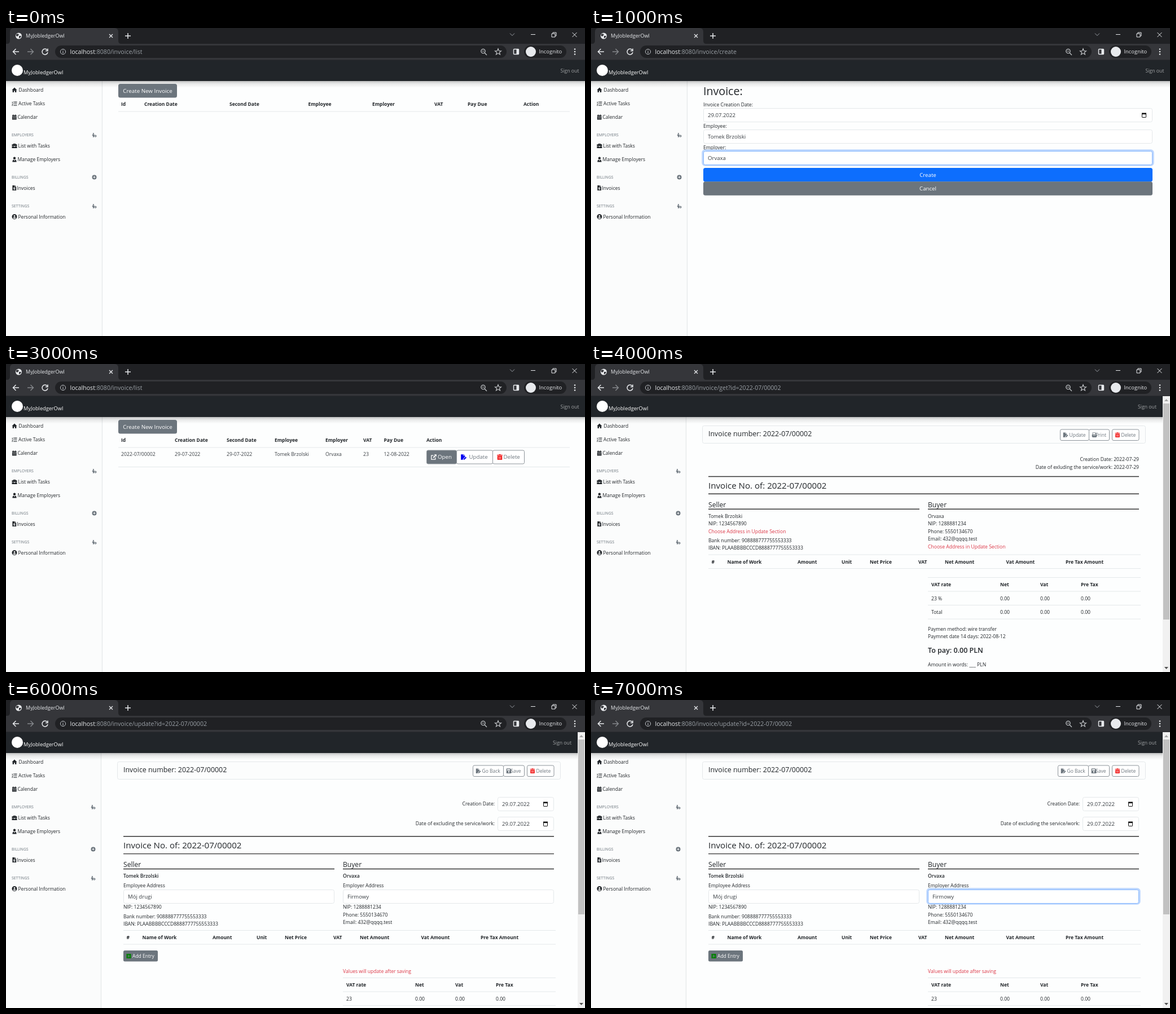
These frames come from a looping animation (1026 by 546 pixels, 8 s). An HTML page:

```html
<!DOCTYPE html>
<html lang="en">
<head>
<meta charset="utf-8">
<title>Invoices</title>
<style>
html, body { margin: 0; width: 100%; height: 100%; overflow: hidden; background: #fdfefe; }
svg { display: block; font-family: "Open Sans", "Noto Sans", sans-serif; }
</style>
</head>
<body>
<svg id="stage" width="1026" height="546" viewBox="0 0 1026 546"></svg>
<script>
const INK = '#212529', GRAY = '#6c757d', RED = '#dc3545', LINE = '#e4e8ea', BAR = '#202124', TAB = '#35363a';
const APP = 'MyJobledgerOwl', PERSON = 'Tomek Brzolski', FIRM = 'Orvaxa', NUMBER = '2022-07/00002';

// y is the vertical centre of the capitals
const text = (x, y, s, { size = 8.6, fill = INK, weight = 400, anchor = 'start' } = {}) =>
  `<text x="${x}" y="${y + size * .357}" font-size="${size}" fill="${fill}" font-weight="${weight}" text-anchor="${anchor}">${s}</text>`;
const rect = (x, y, w, h, fill, r = 0, stroke = 'none', sw = 1) =>
  `<rect x="${x}" y="${y}" width="${w}" height="${h}" rx="${r}" fill="${fill}" stroke="${stroke}" stroke-width="${sw}"/>`;
const path = (d, stroke, w = 1.3, fill = 'none') =>
  `<path d="${d}" stroke="${stroke}" stroke-width="${w}" fill="${fill}"/>`;
const shape = (d, fill) => `<path d="${d}" fill="${fill}" fill-rule="evenodd"/>`;
const disc = (x, y, r, fill, stroke = 'none', w = 1.2) =>
  `<circle cx="${x}" cy="${y}" r="${r}" fill="${fill}" stroke="${stroke}" stroke-width="${w}"/>`;
const rule = (x1, x2, y, color = LINE, w = 1) => path(`M${x1} ${y}H${x2}`, color, w);

// Filled glyphs on a 10 x 10 grid
const GLYPHS = {
  house: 'M5 0L10 5H8.7V9.5H6V6.5H4V9.5H1.3V5H0Z',
  list: 'M0 1.5L1.3 2.8L3 .6V2L1.3 4L0 2.7ZM0 5L1.3 6.2L3 4V5.4L1.3 7.4L0 6.2ZM4 1.5H10V2.7H4ZM4 4.7H10V5.9H4ZM3 8H10V9.2H3ZM0 8H1.6V9.4H0Z',
  calendar: 'M.5 1.2H2V0H3.3V1.2H6.2V0H7.5V1.2H9V3H.5ZM.5 3.6H9V10H.5ZM2 5V6H3.2V5ZM4.2 5V6H5.4V5ZM6.4 5V6H7.6V5ZM2 7.4V8.4H3.2V7.4ZM4.2 7.4V8.4H5.4V7.4ZM6.4 7.4V8.4H7.6V7.4Z',
  briefcase: 'M2.5 2V.5H7.5V2H10V5.2H0V2ZM3.7 2H6.3V1.6H3.7ZM0 5.9H4V7H6V5.9H10V9.5H0Z',
  person: 'M5 0A2.4 2.4 0 0 1 5 4.9A2.4 2.4 0 0 1 5 0ZM1 10Q1 5.7 3.8 5.5L5 8L6.2 5.5Q9 5.7 9 10Z',
  invoice: 'M1 0H5.5V3H8.5V10H1ZM6.2 0L8.5 2.4H6.2ZM4.2 3.6V4.4H3V6.6H5.4V7.4H3V8.2H4.2V9H5.2V8.2H6.4V5.8H4V5.2H6.4V4.4H5.2V3.6Z',
  account: 'M5 0A5 5 0 0 1 5 10A5 5 0 0 1 5 0ZM5 2A1.7 1.7 0 0 0 5 5.4A1.7 1.7 0 0 0 5 2ZM2 7.7Q5 10.2 8 7.7Q7 6.2 5 6.2Q3 6.2 2 7.7Z',
  plus: 'M5 0A5 5 0 0 1 5 10A5 5 0 0 1 5 0ZM4.4 2.5V4.4H2.5V5.6H4.4V7.5H5.6V5.6H7.5V4.4H5.6V2.5Z',
  add: 'M3 0A1.4 1.4 0 0 1 3 2.8A1.4 1.4 0 0 1 3 0ZM1 3.2H5V6H4.4V9.5H1.8V6H0ZM7.5 4.5A2.5 2.5 0 0 1 7.5 9.5A2.5 2.5 0 0 1 7.5 4.5ZM7.5 6A1 1 0 0 0 7.5 8A1 1 0 0 0 7.5 6Z',
  open: 'M0 1.5H4.5V2.8H1.3V8.7H7.2V5.5H8.5V10H0ZM5.5 0H10V4.5L8.5 3L4.8 6.7L3.5 5.4L7.1 1.7Z',
  edit: 'M0 0H4.5V3H7.5V4.6L4 8L3.5 10H0ZM5.2 0L7.5 2.4H5.2ZM8.7 4.4L10.3 6L6.5 9.6L4.5 10L5 8.1Z',
  trash: 'M0 1H3L3.5 0H6.5L7 1H10V2.2H0ZM.7 3H9.3V10H.7ZM2.6 4.2V8.7H3.4V4.2ZM4.6 4.2V8.7H5.4V4.2ZM6.6 4.2V8.7H7.4V4.2Z',
  print: 'M1 0H7L9 2V4H10V9H9V10H1V9H0V4H1ZM2 1V4H8V2.5H6.5V1ZM2 6V6.8H8V6Z',
  save: 'M0 0H8L10 2V10H0ZM1.5 1.5V4H7.5V1.5ZM5 5.2A1.5 1.5 0 0 0 5 8.4A1.5 1.5 0 0 0 5 5.2Z',
  entry: 'M0 0H10V10H0ZM4.3 2V4.3H2V5.7H4.3V8H5.7V5.7H8V4.3H5.7V2Z'
};
const icon = (name, x, y, size, fill) =>
  `<g transform="translate(${x - size / 2} ${y - size / 2}) scale(${size / 10})">${shape(GLYPHS[name], fill)}</g>`;

const head = (y, cells) => cells.map(([x, s]) => text(x, y, s, { size: 8.5, weight: 700 })).join('');
const lines = (x, rows, style) => rows.map(([y, s]) => text(x, y, s, style)).join('');
const dateIcon = (x, y) => rect(x - 3.5, y - 3, 7, 7, 'none', .6, '#111') + rect(x - 4, y - 4, 8, 2.6, '#111');

function input(x, y, w, value, focus) {
  const glow = focus ? rect(x - 1, y - 1, w + 2, 26, 'none', 4, '#bcd6fe', 3.4) : '';
  return glow + rect(x + .5, y + .5, w - 1, 24, '#fff', 3, focus ? '#86b7fe' : LINE) +
    text(x + 8, y + 13, value, { size: 9.6, fill: '#383d42' });
}

// Buttons: [left, width, glyph, label, label x, glyph colour, hovered]
const buttons = (y, h, size, list) => list.map(([x, w, glyph, label, labelX, color, hovered]) =>
  rect(x + .5, y + .5, w, h, hovered ? GRAY : '#fff', 2.5, '#8d949a') +
  icon(glyph, x + (size > 9 ? 13 : 10), y + h / 2 + .5, size, hovered ? '#fff' : color) +
  text(labelX, y + h / 2 + .5, label, { size, fill: hovered ? '#fff' : GRAY })).join('');

function browser(url) {
  const white = '#e8eaed', dim = '#85888c';
  return rect(0, 0, 1026, 57, BAR) + rect(0, 28, 1026, 28.5, TAB) +
    shape('M2 28Q7 28 7 22V7Q7 0 14 0H192Q199 0 199 7V22Q199 28 204 28Z', TAB) +
    disc(22.5, 14, 5.5, white) + shape('M18 11Q22 9 23 12L20 15L18 14ZM23 14H27Q26 18 23 18Z', TAB) +
    text(35, 13.7, APP, { size: 9, fill: white }) +
    path('M183 11L189 17M189 11L183 17', white) + path('M211 14H221M216 9V19', white, 1.5) +
    path('M893 9.5L897 13.5L901 9.5', '#9aa0a6', 1) +
    path('M930 11.5H938M967 10V16H973V10ZM969 10V8H975V14H973M1003.500 8L1011.500 16M1011.500 8L1003.500 16', white, 1) +
    path('M23 42H13M17.500 37L12.500 42L17.500 47', white, 1.5) +
    path('M38 42H48M43.500 37L48.500 42L43.500 47', dim, 1.4) +
    path('M73 39A5 5 0 1 0 74 43M74 36.500V40.500H70', white, 1.5) +
    rect(87, 31, 800, 22, BAR, 11) + disc(101, 42, 4.6, 'none', '#bdc1c6', 1) + path('M101 41V45M101 39V40', '#bdc1c6', 1.1) +
    text(113.5, 42, `localhost<tspan fill="#9aa0a6">:8080/invoice/${url}</tspan>`, { size: 10.6, fill: white }) +
    disc(845.5, 41, 3.7, 'none', '#c6c9cc') + path('M848 44L852 48M843.500 41H847.500', '#c6c9cc', 1.2) +
    path('M872 36.500L873.500 40.500L877.500 40.700L874.300 43.200L875.500 47L872 44.800L868.500 47L869.700 43.200L866.500 40.700L870.500 40.500Z', '#c6c9cc', 1.1) +
    rect(899.5, 37.5, 9, 9, 'none', 1, white, 1.4) + rect(904.5, 37.5, 4, 9, white) +
    rect(918, 31, 75, 22, BAR, 11) + disc(930, 42, 9, white) +
    text(944.5, 42, 'Incognito', { size: 9.4, fill: white }) +
    [37.5, 42, 46.500].map(y => disc(1008, y, 1.3, white)).join('');
}

function frame(url, thumbEnd) {
  const side = thumbEnd ? 168.5 : 170.5, right = thumbEnd ? 1002 : 1015.5;
  const items = [[110, 'house', 'Dashboard', 22.5], [134, 'list', 'Active Tasks', 22], [158, 'calendar', 'Calendar', 20.5],
    [209, 'briefcase', 'List with Tasks', 21.5], [233, 'person', 'Manage Employers', 20.5],
    [283.5, 'invoice', 'Invoices', 19.5], [334.5, 'account', 'Personal Information', 21.5]];
  const groups = [[190, 'EMPLOYERS', 'add'], [264.5, 'BILLINGS', 'plus'], [316, 'SETTINGS', 'add']];
  const scrollbar = thumbEnd ? rect(1013, 57, 13, 489, '#f1f1f1') + rect(1014, 70, 11, thumbEnd - 70, '#c1c1c1') +
    shape('M1016 66L1019.500 62L1023 66Z', '#a3a3a3') + shape('M1016 537L1019.500 541L1023 537Z', '#505050') : '';
  return `<defs><linearGradient id="shade" x2="0" y2="1"><stop stop-color="#000" stop-opacity=".24"/>
    <stop offset=".4" stop-color="#000" stop-opacity=".08"/><stop offset="1" stop-opacity="0"/></linearGradient></defs>` +
    rect(0, 57, side, 489, '#fbfcfc') + path(`M${side} 94V546`, '#e6e9ea') +
    rect(0, 94, 1026, 12, 'url(#shade)') + rect(0, 57, 1026, 37, INK) +
    disc(20, 75, 10, '#fff') + text(31, 79, APP, { size: 9.2, fill: '#fff' }) +
    text(right, 76, 'Sign out', { size: 8.7, fill: '#a0a3a5', anchor: 'end' }) +
    items.map(([y, glyph, s, x]) => icon(glyph, 15, y, 9, INK) + text(x, y, s, { size: 8.5, weight: 500 })).join('') +
    groups.map(([y, s, glyph]) => text(10, y, s, { size: 6.9, fill: GRAY, weight: 500 }) +
      icon(glyph, side - 14, y, 8, GRAY)).join('') + scrollbar + browser(url);
}

function listPage(filled, hoverOpen) {
  const xs = filled ? [204, 299, 391, 476, 566, 633, 669.5, 745] : [204, 245, 396, 535.5, 649, 759, 818, 917];
  const titles = ['Id', 'Creation Date', 'Second Date', 'Employee', 'Employer', 'VAT', 'Pay Due', 'Action'];
  const values = [NUMBER, '29-07-2022', '29-07-2022', PERSON, FIRM, '23', '12-08-2022'];
  return frame('list') + rect(199, 99, 104, 24.5, GRAY, 3.5) +
    text(251, 111.5, 'Create New Invoice', { size: 9.8, fill: '#fff', anchor: 'middle' }) +
    head(135, titles.map((s, i) => [xs[i], s])) + rule(199, 999, 148) +
    (filled ? values.map((s, i) => text(xs[i], 160, s, { size: 8.7, fill: '#3a3f44' })).join('') + rule(199, 999, 182.5) +
      buttons(152.5, 24, 9.7, [[745, 53, 'open', 'Open', 765, '#008000', hoverOpen],
        [798, 64, 'edit', 'Update', 820.5, '#0000f0'], [862, 56, 'trash', 'Delete', 881.5, '#f00000']]) : '');
}

function createPage() {
  const bar = (y, s, fill) => rect(199, y, 796, 24.5, fill, 3.5) +
    text(597, y + 12.5, s, { size: 9.7, fill: '#fff', anchor: 'middle' });
  return frame('create') + text(199, 112.5, 'Invoice:', { size: 19.6, weight: 500 }) +
    lines(199, [[136, 'Invoice Creation Date:'], [174, 'Employee:'], [211.5, 'Employer:']]) +
    input(199, 142, 796, '29.07.2022') + dateIcon(980, 154.5) + input(199, 180, 796, PERSON) +
    input(199, 218, 796, FIRM, true) + bar(248, 'Create', '#0d6efd') + bar(272.3, 'Cancel', GRAY);
}

function invoiceTop(shift, actions) {
  return rect(197.5, 109.5, 785, 31, '#fcfdfd', 3, LINE) +
    text(208, 124, 'Invoice number: ' + NUMBER, { size: 12.4, weight: 500 }) +
    buttons(115.5, 19.5, 8.5, [...actions, [923, 47.5, 'trash', 'Delete', 939.5, '#f00000']]) +
    rule(208, 971, 199.5 + shift, '#333', 1.4) + rule(208, 971, 230.3 + shift, '#333', 1.4) +
    text(208, 215.5 + shift, 'Invoice No. of: ' + NUMBER, { size: 15.1, weight: 500 }) +
    [[208, 'Seller'], [597, 'Buyer']].map(([x, s]) => text(x, 249.5 + shift, s, { size: 12.1, weight: 500 }) +
      rule(x, x + 374, 257.2 + shift, '#333', 1.4)).join('');
}

const workTable = y => rule(208, 974, y - 12.5) + rule(208, 974, y + 12) +
  head(y, [[213.5, '#'], [241.5, 'Name of Work'], [366, 'Amount'], [444, 'Unit'], [494, 'Net Price'], [580, 'VAT'],
    [627, 'Net Amount'], [735.5, 'Vat Amount'], [841, 'Pre Tax Amount']]);
const taxTable = (y, labels) => rule(597, 974, y - 12.5) + rule(597, 974, y + 12) +
  head(y, [[603, 'VAT rate'], [725, 'Net'], [796, 'Vat'], [868, 'Pre Tax']]) +
  labels.map((label, i) => [[603, label], [725, '0.00'], [796, '0.00'], [868, '0.00']]
    .map(([x, s]) => text(x, y + 24.5 * (i + 1), s)).join('') + rule(597, 974, y + 12 + 24.5 * (i + 1))).join('');

const NIP = 'NIP: 1234567890', BANK = 'Bank number: 908888777755553333', IBAN = 'IBAN: PLAABBBBCCCD8888777755553333';
const BUYER = ['NIP: 1288881234', 'Phone: 5550134670', 'Email: 432@qqqq.test'];
const CHOOSE = 'Choose Address in Update Section';

function viewPage(hoverUpdate) {
  return frame('get?id=' + NUMBER, 453) +
    invoiceTop(0, [[831, 51, 'edit', 'Update', 847.5, GRAY, hoverUpdate], [882, 36, 'print', 'Print', 894, GRAY]]) +
    lines(971, [[169, 'Creation Date: 2022-07-29'], [182.5, 'Date of exluding the service/work: 2022-07-29']], { anchor: 'end' }) +
    lines(208, [[270, PERSON], [283, NIP], [313, BANK], [326, IBAN]]) +
    lines(597, [[270, FIRM], ...BUYER.map((s, i) => [283 + 13.5 * i, s])]) +
    text(208, 296.5, CHOOSE, { fill: RED }) + text(597, 324, CHOOSE, { fill: RED }) +
    workTable(350.5) + taxTable(391, ['23 %', 'Total']) +
    lines(597, [[469.5, 'Paymen method: wire transfer'], [483, 'Paymnet date 14 days: 2022-08-12'], [532.5, 'Amount in words: ___ PLN']]) +
    text(597, 508, 'To pay: 0.00 PLN', { size: 12.5, weight: 600 });
}

function updatePage(focusBuyer) {
  return frame('update?id=' + NUMBER, 380) +
    invoiceTop(42.3, [[827, 54, 'edit', 'Go Back', 843.5, GRAY], [881, 37, 'save', 'Save', 894, GRAY]]) +
    lines(866, [[184, 'Creation Date:'], [218.5, 'Date of excluding the service/work:']], { anchor: 'end' }) +
    [172, 207].map(y => input(871, y, 100, '29.07.2022') + dateIcon(956, y + 12.5)).join('') +
    text(208, 312, PERSON, { weight: 600 }) + text(597, 312, FIRM, { weight: 600 }) +
    lines(208, [[329, 'Employee Address'], [367, NIP], [383.5, BANK], [397, IBAN]]) +
    lines(597, [[329, 'Employer Address'], ...BUYER.map((s, i) => [367 + 13.7 * i, s])]) +
    input(208, 336, 374, 'Mój drugi') + input(597, 336, 374, 'Firmowy', focusBuyer) +
    workTable(421) + rect(208, 444, 61, 19.5, GRAY, 2.5) + icon('entry', 217.5, 454, 8, '#008000') +
    text(224, 454, 'Add Entry', { size: 8.5, fill: '#fff' }) +
    text(597, 481, 'Values will update after saving', { fill: RED }) + taxTable(505, ['23']);
}

const scenes = [listPage(false), createPage(), listPage(true), listPage(true, true),
  viewPage(false), viewPage(true), updatePage(false), updatePage(true)];
const stage = document.getElementById('stage');
let shown = -1;
function tick() {
  const current = Math.floor(performance.now() % 8000 / 1000);
  if (current !== shown) stage.innerHTML = scenes[shown = current];
  requestAnimationFrame(tick);
}
tick();
</script>
</body>
</html>
```
